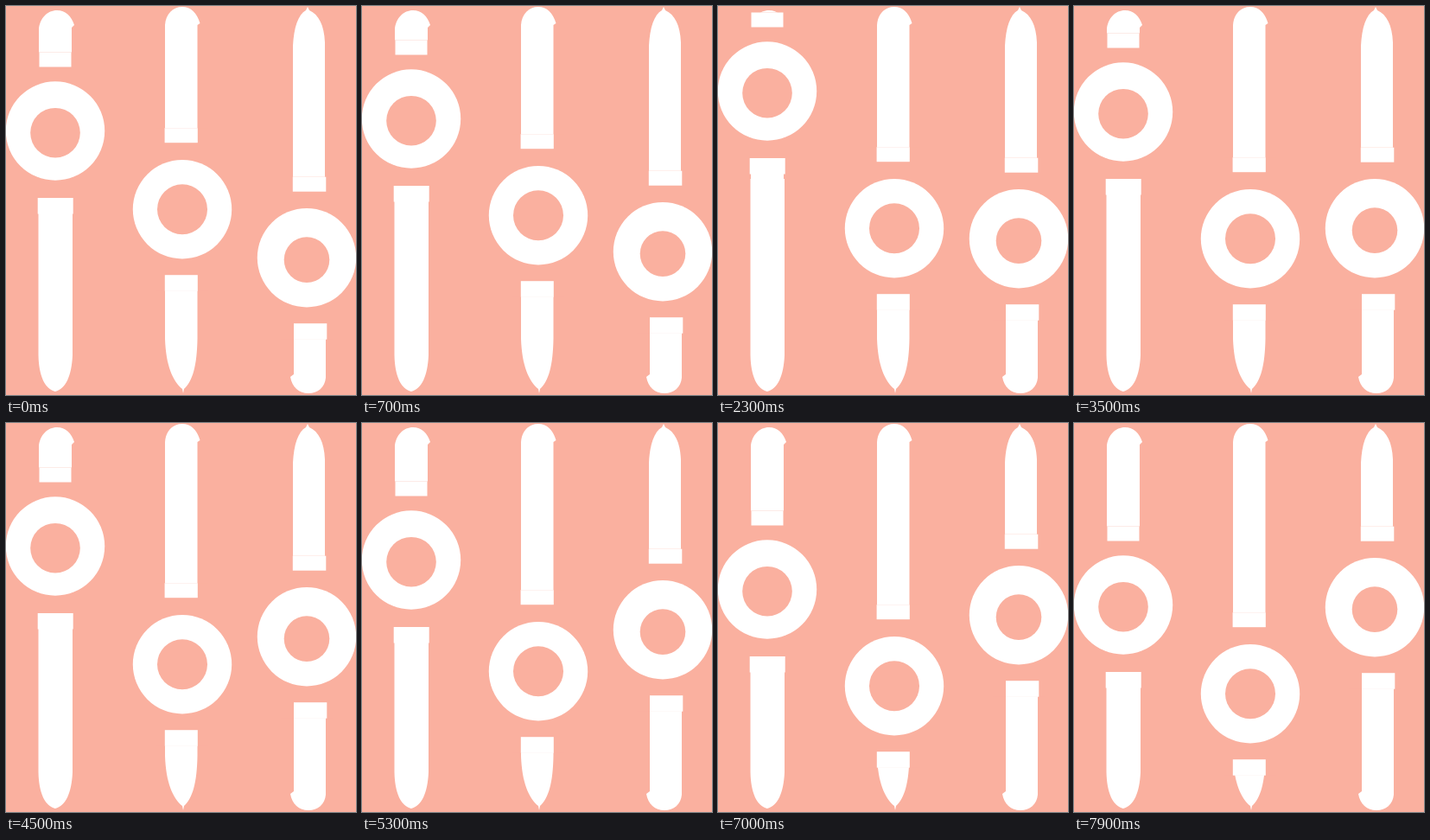
Animation, 405 px wide and 450 px high, one loop 8 s. Source, as an HTML page:

```html
<!DOCTYPE html>
<html lang="en">
<head>
<meta charset="utf-8">
<title>Sliders</title>
<style>
  html, body { margin: 0; width: 100%; height: 100%; overflow: hidden; background: #fab09f; }
  svg { display: block; width: 100vw; height: 100vh; }
</style>
</head>
<body>
<svg viewBox="0 0 405 450">
  <defs>
    <filter id="soft" filterUnits="userSpaceOnUse" x="-10" y="-10" width="425" height="470" color-interpolation-filters="sRGB">
      <feGaussianBlur stdDeviation="0.55"/>
    </filter>
  </defs>
  <rect width="405" height="450" fill="#fab09f"/>
  <g id="stage" filter="url(#soft)" fill="#fff">
    <path d="M38 27C39 14 48 5 59 5C69 5 76 12 79 22L76 25V200H77V404C76 428 69 443 57 446C45 443 38 428 37.5 404V200H38Z"/>
    <path d="M184 22C185 9 193 1 204 1C214 1 221 8 224.500 20L221.500 22V385C221 416 216 434 206 443L205 448L204 443C193 434 185 416 184 385Z"/>
    <path d="M332 46C333 25 338 10 347 5L349 1L351 5C362 10 368 22 369 42V220H370V430C369 441 361 448 350 448C339 448 331 441 329 429L333 426V220H332Z"/>
  </g>
</svg>
<script>
const SVG_NS = "http://www.w3.org/2000/svg";
const STEP = 100, STEPS = 80;
const PINK = "#fab09f", WHITE = "#fff";
const stage = document.getElementById("stage");

function add(parent, tag, attrs) {
  const node = document.createElementNS(SVG_NS, tag);
  for (const key in attrs) node.setAttribute(key, attrs[key]);
  return parent.appendChild(node);
}

function box(parent, left, right, top, bottom, fill) {
  add(parent, "rect", { x: left, y: top, width: right - left, height: bottom - top, fill });
}

// A knob carries its own short bar ends and hides the bar behind it.
function makeKnob({ x, upper, lower, hole }) {
  const knob = add(stage, "g", {});
  box(knob, x - 30, x + 30, upper.y - 17, lower.y + 18, PINK);
  box(knob, upper.left, upper.right, upper.y - 17, upper.y, WHITE);
  box(knob, lower.left, lower.right, lower.y, lower.y + 18.5, WHITE);
  add(knob, "circle", { cx: x, cy: 0, r: 57.2, fill: WHITE });
  add(knob, "circle", { cx: x, cy: hole.y, r: hole.r, fill: PINK });
  return knob;
}

const drift = n => n < 10 ? n : n - 1;

const knobs = [
  {
    x: 57, hole: { y: 2.2, r: 28.8 },
    upper: { left: 38.5, right: 75.5, y: -74 },
    lower: { left: 36.7, right: 77.7, y: 77.5 },
    at: n => 98.5 + 2 * Math.abs(n - 23)
  },
  {
    x: 204, hole: { y: 0, r: 29 },
    upper: { left: 183.6, right: 221.8, y: -77 },
    lower: { left: 183.8, right: 221.8, y: 76 },
    at: n => 235.2 + drift(n)
  },
  {
    x: 348, hole: { y: 2.4, r: 26.3 },
    upper: { left: 331.8, right: 370.3, y: -76.5 },
    lower: { left: 333, right: 371.3, y: 76 },
    at: n => 291.2 - drift(n)
  }
].map(spec => ({ node: makeKnob(spec), at: spec.at }));

function draw(time) {
  const n = Math.floor(time / STEP) % STEPS;
  for (const { node, at } of knobs) node.setAttribute("transform", `translate(0 ${at(n)})`);
}

let start;
function tick(now) {
  start ??= now;
  draw(now - start);
  requestAnimationFrame(tick);
}
draw(0);
requestAnimationFrame(tick);
</script>
</body>
</html>
```
